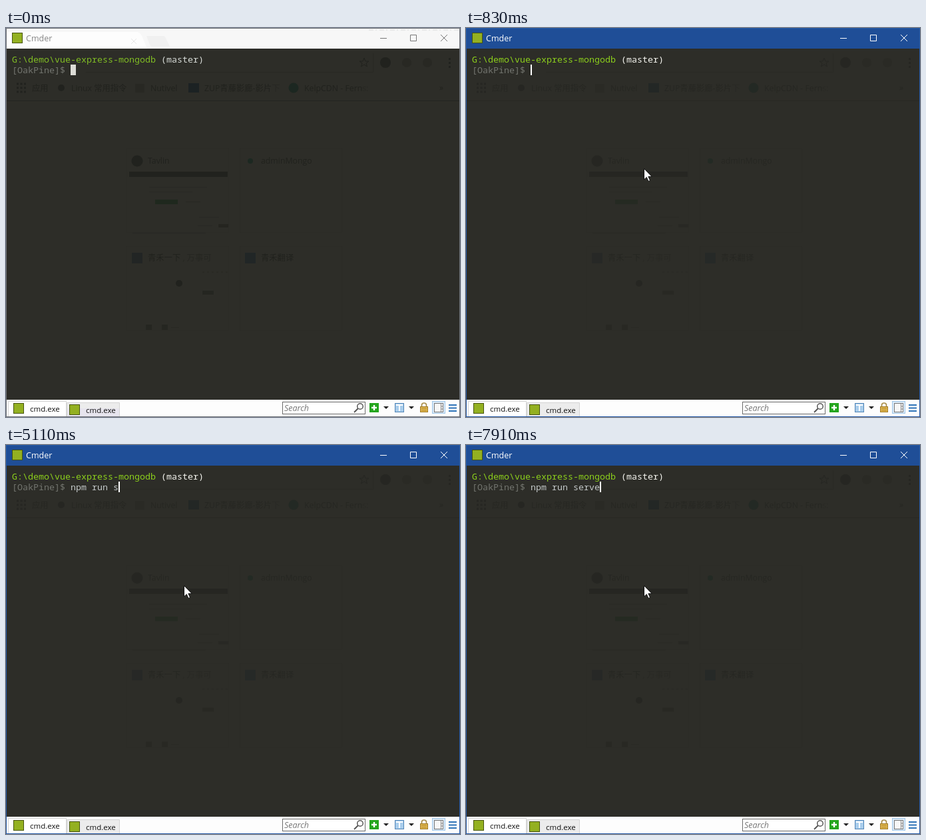
An HTML page that plays this animation: 682 px wide and 585 px high, repeating every 7.99 s.

```html
<!DOCTYPE html>
<html lang="en">
<head>
<meta charset="utf-8">
<title>Terminal</title>
<style>
  html, body { margin: 0; width: 100%; height: 100%; overflow: hidden; background: #2d2d28; }
  svg { display: block; width: 682px; height: 585px; }
  text { white-space: pre; font-family: "Open Sans", "Noto Sans CJK SC", "Noto Sans CJK", sans-serif; }
  .term text { font: 13.33px "Noto Sans Mono", "DejaVu Sans Mono", monospace; fill: #c3c8c8; }
  .term .path { fill: #80bd24; }
  .term .branch { fill: #d8dcd8; }
  .term .prompt { fill: #73756f; }
  .active .term .path { fill: #8ccf1c; }
  .active .term .branch { fill: #f6f6f0; }
  .ghost { fill: #181a16; opacity: .55; }
  .ghost text { font-size: 12.3px; }
  .active .ghost { opacity: .3; }
  .bar { fill: #fafafa; }
  .title { font-size: 12.5px; fill: #858585; }
  .buttons { stroke: #777; fill: none; }
  .border { fill: none; stroke: #6d7177; }
  .active .bar { fill: #1f4e97; }
  .active .title { fill: #fff; }
  .active .buttons { stroke: #fff; }
  .active .border { stroke: #2458a5; }
  .active .idle, svg:not(.active) .caret { display: none; }
  .icon { fill: #93b021; stroke: #46540f; }
  .tab { font-size: 11.5px; fill: #111; }
</style>
</head>
<body>
<svg id="stage" viewBox="0 0 682 585">
  <rect width="682" height="585" fill="#2d2d28"/>

  <g class="ghost">
    <path d="M0 109h682v1H0z" opacity=".7"/>
    <path d="M120 66h432v1H120zM551 38h1v28h-1z" opacity=".35"/>
    <path d="M181.500 181.500h153v126h-153zM351.500 181.500h153v126h-153zM181.500 328.500h153v126h-153zM351.500 328.500h153v126h-153z" fill="none" stroke="#181a16" opacity=".12"/>
    <path d="M538 45l2 5h5l-4 3 1.500 5-4.500-3-4.500 3 1.500-5-4-3h5z" fill="none" stroke="#181a16"/>
    <circle cx="570" cy="52" r="8"/>
    <circle cx="602" cy="52" r="7" opacity=".4"/>
    <circle cx="633" cy="52" r="7" opacity=".4"/>
    <path d="M665 45h3v3h-3zM665 51h3v3h-3zM665 57h3v3h-3z"/>
    <path d="M16 84h14M16 90h14M16 96h14" stroke="#181a16" stroke-width="3" stroke-dasharray="3 2.500"/>
    <circle cx="83" cy="90" r="5"/>
    <rect x="194" y="84" width="14" height="13" opacity=".35"/>
    <rect x="274" y="83" width="16" height="14" fill="#101b20"/>
    <circle cx="432" cy="90" r="7.500" fill="#10231c"/>
    <text x="39" y="95">应用</text>
    <text x="98" y="95">Linux 常用指令</text>
    <text x="217" y="95">Nutivel</text>
    <text x="298" y="95">ZUP青藤影廊-影片<tspan opacity=".4">下</tspan></text>
    <text x="448" y="95">KelpCDN - Fern<tspan opacity=".4">s:</tspan></text>
    <text x="651" y="94">»</text>

    <circle cx="197" cy="200" r="8.500"/>
    <text x="213" y="204">Tavlin</text>
    <path d="M185 216h148v8H185z"/>
    <path d="M215 239h87v1h-87zM215 246h65v1h-65zM290 284h30v1h-30zM288 297h22v1h-22zM190 308h110v1H190z" opacity=".3"/>
    <path d="M224 258h34v7h-34z" fill="#142616"/>
    <path d="M319 295h15v5h-15z" opacity=".65"/>
    <path d="M270 261h22v1h-22z" opacity=".4"/>
    <circle cx="367" cy="200" r="4" fill="#10251d"/>
    <text x="383" y="204">adminMongo</text>

    <rect x="189" y="338" width="16" height="16" fill="#161d22" opacity=".8"/>
    <text x="213" y="350">青禾一下<tspan opacity=".55"> , 万事可</tspan></text>
    <rect x="359" y="338" width="16" height="16" fill="#131f26" opacity=".8"/>
    <text x="383" y="350">青禾翻译</text>
    <path d="M295 367h38" stroke="#181a16" stroke-dasharray="3 4" opacity=".5"/>
    <circle cx="260" cy="384" r="5"/>
    <path d="M295 395h17v6h-17zM210 446h9v8h-9zM234 446h9v8h-9z" opacity=".6"/>
    <path d="M248 450h12v1h-12z" opacity=".3"/>
  </g>

  <g class="term">
    <text class="path" x="9" y="52">G:\demo\vue-express-mongodb</text>
    <text class="branch" x="233" y="52">(master)</text>
    <text class="prompt" x="9" y="68">[OakPine]$</text>
    <text id="command" x="97" y="68"></text>
    <rect class="idle" x="97" y="55" width="8" height="16" fill="#dcdcd6"/>
    <rect id="caret" class="caret" y="55" width="2" height="16" fill="#fff"/>
  </g>

  <rect class="bar" width="682" height="31"/>
  <g class="idle">
    <path d="M0 1h682v30H0z" fill="#f7f7f7"/>
    <path d="M0 6h198q5 2 7 8l7 17H0z" fill="#fdfdfd"/>
    <path d="M211 12h25q3 0 4 3l6 13h-26q-3 0-4-3z" fill="#f0f0f0"/>
    <path d="M188 16l8 8M196 16l-8 8" stroke="#e6e6e6"/>
    <path d="M545 3h135" stroke="#dedede" stroke-dasharray="7 3 2 4"/>
  </g>
  <rect class="icon" x="9.500" y="7.500" width="15" height="15"/>
  <text class="title" x="30" y="20">Cmder</text>
  <path class="buttons" d="M562 15.500h10M607.500 10.500h9v9h-9zM653 10l10 10M663 10l-10 10"/>

  <rect y="559" width="682" height="26" fill="#fdfdfd"/>
  <path d="M91.500 585v-21.500h79V585" fill="#ececec" stroke="#d4d4d4"/>
  <path class="idle" d="M92 572h78v13H92z" fill="#e7e5ee"/>
  <path d="M3.500 585v-23.500h87V585" fill="#fff" stroke="#d4d4d4"/>
  <rect class="icon" x="11.500" y="564.500" width="15" height="15"/>
  <rect class="icon" x="95.500" y="566.500" width="15" height="15"/>
  <text class="tab" x="36" y="577">cmd.exe</text>
  <text class="tab" x="120" y="579">cmd.exe</text>

  <rect x="415.500" y="562.500" width="124" height="18" fill="#fff" stroke="#6a6a6a"/>
  <text x="418" y="576" font-size="12.5" font-style="italic" fill="#777">Search</text>
  <g fill="none" stroke="#555" stroke-width="1.500">
    <circle cx="532" cy="569" r="4.300"/>
    <path d="M529 572l-6 6" stroke-width="2"/>
  </g>
  <rect x="546" y="564" width="14" height="14" fill="#24a51d"/>
  <path d="M553 567v8M549 571h8" stroke="#fff" stroke-width="2.400"/>
  <path d="M567 569h8l-4 4zM605 569h8l-4 4z" fill="#222"/>
  <rect x="584.500" y="564.500" width="13" height="13" fill="#a9cdec" stroke="#5386b7"/>
  <path d="M586 567h10M591 568v8" stroke="#fff" stroke-width="2"/>
  <path d="M624.500 570v-3q0-3 3.500-3t3.500 3v3" fill="none" stroke="#a88c48" stroke-width="1.700"/>
  <rect x="622.500" y="569.500" width="11" height="8" fill="#dfb64e" stroke="#a17b26"/>
  <path d="M624 572h8M624 575h8" stroke="#b48b30"/>
  <rect x="640.500" y="561.500" width="19" height="18" fill="#dcebf8" stroke="#a0c6e8"/>
  <rect x="643.500" y="564.500" width="13" height="13" fill="#f7f7f7" stroke="#777"/>
  <path d="M653.500 565v12M655 568v2M655 572v2" stroke="#888"/>
  <path d="M665 567h12M665 571.500h12M665 576h12" stroke="#2e73b8" stroke-width="2"/>

  <rect class="border" x=".5" y=".5" width="681" height="584"/>
  <path id="pointer" d="M0 0v16.500l3.800-3.600 2.700 6.100 2.600-1.100-2.700-6h5.200z" fill="#fff" stroke="#111"/>
</svg>

<script>
  const LOOP = 7990, FOCUS = 800, BLINK = 530, CHAR = 8;
  const COMMAND = "npm run serve";
  const keyTimes = [1850, 2130, 2380, 2700, 3650, 3920, 4240, 4640, 5060, 5400, 5710, 6260, 7830];
  // time, x, y
  const pointerPath = [[230, 560, 575], [310, 459, 466], [385, 362, 371], [460, 287, 252], [560, 267, 211]];

  const [stage, command, caret, pointer] =
    ["stage", "command", "caret", "pointer"].map(id => document.getElementById(id));

  function pointerAt(t) {
    const i = pointerPath.findIndex(p => p[0] > t);
    if (i < 0) return pointerPath.at(-1).slice(1);
    if (i === 0) return null;
    const [t0, ...from] = pointerPath[i - 1], [t1, ...to] = pointerPath[i];
    return from.map((v, k) => Math.round(v + (to[k] - v) * (t - t0) / (t1 - t0)));
  }

  function draw(now) {
    const t = now % LOOP;
    stage.classList.toggle("active", t >= FOCUS);

    const typed = keyTimes.filter(k => k <= t).length;
    const lastKey = typed ? keyTimes[typed - 1] : FOCUS;
    command.textContent = COMMAND.slice(0, typed);
    caret.setAttribute("x", 97 + typed * CHAR);
    caret.style.visibility = Math.floor((t - lastKey) / BLINK) % 2 ? "hidden" : "visible";

    const tip = pointerAt(t);
    pointer.style.visibility = tip ? "visible" : "hidden";
    if (tip) pointer.setAttribute("transform", `translate(${tip[0] + .5} ${tip[1] + .5})`);
  }

  const start = performance.now();
  function tick() {
    draw(performance.now() - start);
    requestAnimationFrame(tick);
  }
  tick();
</script>
</body>
</html>
```
